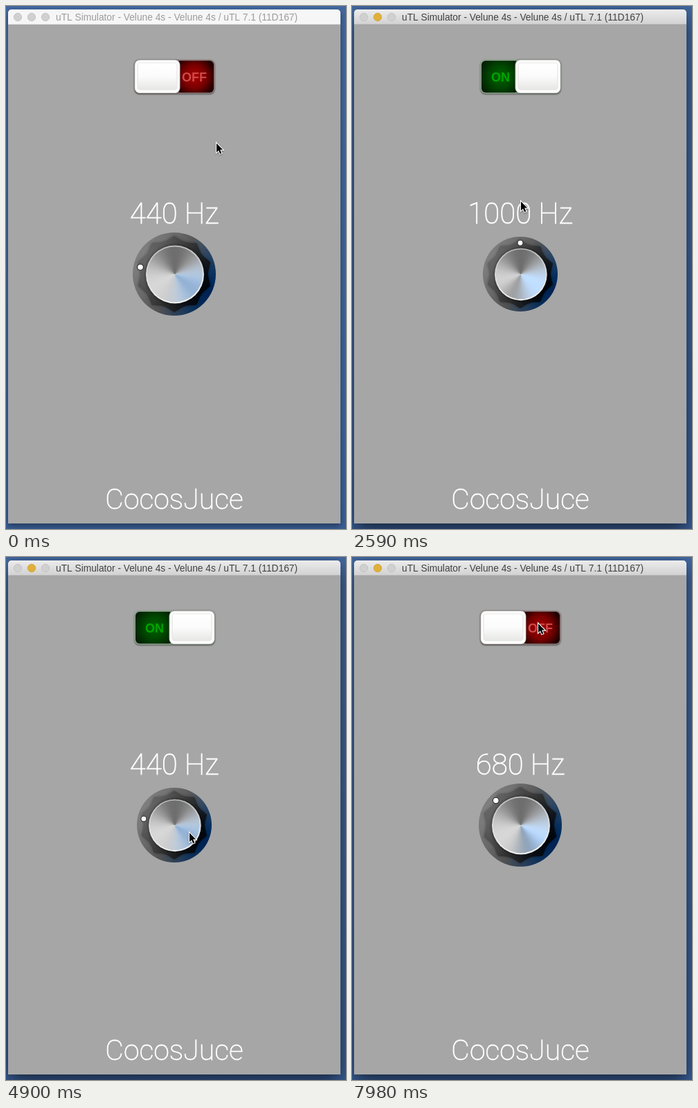
An HTML page with a canvas that plays this animation: 491 by 755 pixels, repeating every 9.03 s.

```html
<!DOCTYPE html>
<html lang="en">
<head>
<meta charset="utf-8">
<title>Tone knob</title>
<style>
html, body { margin: 0; width: 100%; height: 100%; overflow: hidden; background: #3f649b; }
canvas { display: block; }
</style>
</head>
<body>
<canvas id="stage" width="491" height="755"></canvas>
<script>
const ctx = document.getElementById('stage').getContext('2d');
const LOOP = 9030, TICK = 70, TAU = Math.PI * 2;
const rad = degrees => degrees * Math.PI / 180;
const cosd = degrees => Math.cos(rad(degrees));
const lerp = (a, b, k) => a + (b - a) * k;
const clamp = k => Math.min(1, Math.max(0, k));

const linear = k => k;
const easeIn = k => k * k;
const easeBoth = k => k * k * (3 - 2 * k);

// Pointer moves; those with a pitch also turn the knob
const moves = [
  { from: 280, to: 840, x: 229, y: 103, ease: easeBoth },
  { from: 1260, to: 2240, x: 250, y: 345, ease: easeBoth, sway: 50 },
  { from: 2240, to: 2590, x: 243, y: 281, pitch: 1000 },
  { from: 2590, to: 3360, x: 242, y: 193, pitch: 2000 },
  { from: 3710, to: 4900, x: 264, y: 397, pitch: 440, ease: easeIn },
  { from: 4900, to: 5390, x: 262, y: 406, pitch: 340 },
  { from: 5670, to: 6300, x: 251, y: 350, pitch: 480 },
  { from: 6370, to: 6510, x: 251, y: 346, pitch: 680 },
  { from: 6790, to: 7350, x: 268, y: 95, ease: easeBoth }
];

function poseAt(t) {
  const pose = { x: 303, y: 197, pitch: 440 };
  for (const { from, to, x, y, pitch = pose.pitch, ease = linear, sway = 0 } of moves) {
    const k = ease(clamp((t - from) / (to - from)));
    pose.x = lerp(pose.x, x, k) - sway * Math.sin(TAU * k);
    pose.y = lerp(pose.y, y, k);
    pose.pitch = lerp(pose.pitch, pitch, k);
  }
  return pose;
}

function box(x, y, w, h, r, fill) {
  ctx.beginPath();
  ctx.roundRect(x, y, w, h, r);
  ctx.fillStyle = fill;
  ctx.fill();
}

function disc(x, y, r, fill) {
  ctx.beginPath();
  ctx.arc(x, y, r, 0, TAU);
  ctx.fillStyle = fill;
  ctx.fill();
}

function outline(color, width) {
  ctx.strokeStyle = color;
  ctx.lineWidth = width;
  ctx.stroke();
}

function shaded(blur, offsetY, alpha, paint) {
  ctx.save();
  ctx.shadowColor = `rgba(0,0,0,${alpha})`;
  ctx.shadowBlur = blur;
  ctx.shadowOffsetY = offsetY;
  paint();
  ctx.restore();
}

// Colours spread evenly over a gradient
function spread(gradient, ...colors) {
  colors.forEach((color, i) => gradient.addColorStop(i / (colors.length - 1), color));
  return gradient;
}
const vertical = (top, bottom, ...colors) =>
  spread(ctx.createLinearGradient(0, top, 0, bottom), ...colors);

// Grey level and blue tint as functions of the bearing, clockwise from the top
function sweep(gray, tint) {
  const colors = Array.from({ length: 91 }, (_, i) => {
    const g = gray(i * 4), b = tint(i * 4);
    return `rgb(${g - b * 0.5},${g + b * 0.2},${g + b})`;
  });
  return spread(ctx.createConicGradient(rad(-90), 0, 0), ...colors);
}

function text(string, x, y, font, color, align = 'center') {
  ctx.font = font;
  ctx.textAlign = align;
  ctx.fillStyle = color;
  ctx.fillText(string, x, y);
}

function label(string, y, size) {
  text(string, 243, y, `100 ${size}px Roboto, sans-serif`, '#fff');
  ctx.strokeStyle = '#fff';
  ctx.lineWidth = 0.8;
  ctx.strokeText(string, 243, y);
}

function drawWindow(active) {
  ctx.fillStyle = vertical(0, 755, '#42689f', '#3a5f97');
  ctx.fillRect(0, 0, 491, 755);
  shaded(active ? 26 : 10, active ? 10 : 4, active ? 0.6 : 0.4,
    () => box(3, 5, 480, 742, [5, 5, 0, 0], '#a6a6a6'));
  box(3, 5, 480, 21, [5, 5, 0, 0], active ? vertical(5, 26, '#ececec', '#d2d2d2') : '#f6f6f6');
  ctx.fillStyle = active ? '#b4b4b4' : '#d2d2d2';
  ctx.fillRect(3, 26, 480, 1);
  for (let i = 0; i < 3; i++) {
    const lit = active && i === 1;
    disc(17 + 20 * i, 16, 5.7, lit ? '#dfb03a' : '#d0d0d0');
    outline(lit ? '#cfa137' : '#bfbfbf', 0.8);
  }
  text('uTL Simulator - Velune 4s - Velune 4s / uTL 7.1 (11D167)', 72, 21,
    '13.75px "Liberation Sans", Arial, sans-serif', active ? '#424242' : '#9c9c9c', 'left');
}

function drawSwitch(on) {
  const panelX = on ? 187 : 246, thumbX = on ? 236 : 186, middle = on ? 214.5 : 272;
  shaded(2, 1, 0.55, () => box(185.5, 77.5, 116, 49, 7, on ? '#8aa68a' : '#8c7777'));
  const glow = ctx.createRadialGradient(middle, 102, 2, middle, 102, 32);
  box(panelX, 79, 54, 46, 6, on
    ? spread(glow, '#006400', '#004400', '#051c05')
    : spread(glow, '#a80000', '#780000', '#180000'));
  text(on ? 'ON' : 'OFF', middle, 108.5, 'bold 18px "Liberation Sans", Arial, sans-serif',
    on ? '#00a400' : '#cc4a4a');
  shaded(3, 0, 0.5, () => box(thumbX, 78, 65, 47.5, 7, '#fff'));
  outline('#c9cac8', 0.8);
  box(thumbX + 4, 82, 57, 39, 4, vertical(82, 121, '#fff', '#fbfbfb', '#e6e7e5'));
  outline('#e5e5e3', 1.2);
}

function drawKnob(angle, scale) {
  ctx.save();
  ctx.translate(243, 387);
  ctx.scale(scale, scale);

  // The ring is lit from the upper left and reflects blue on the right
  const lit = a => ((1 + cosd(a - 300)) / 2) ** 0.7;
  const blue = a => Math.max(0, cosd(a - 115));
  disc(0, 0, 60, sweep(a => 22 + 104 * lit(a), a => 62 * blue(a)));

  ctx.beginPath();
  for (let a = 0; a < 360; a += 2) {
    const r = 55 - 6 * Math.abs(Math.sin(rad(a * 5)));
    ctx.lineTo(r * Math.sin(rad(a)), -r * Math.cos(rad(a)));
  }
  ctx.closePath();
  ctx.fillStyle = sweep(a => 4 + 96 * lit(a) ** 1.4, a => 10 * blue(a));
  shaded(4, 0, 0.35, () => ctx.fill());

  // Brushed cap, with a darker streak that follows the knob
  const metal = a => 180 - 46 * cosd(a) - 24 * cosd(2 * a)
    - 45 * Math.max(0, cosd(a - angle - 205)) ** 6;
  shaded(5, 0, 0.6, () => disc(1, 0.5, 42, vertical(-42, 42, '#b8baba', '#dedfdf', '#f2f2f2')));
  ctx.translate(0.8, 0.4);
  disc(0, 0, 40, sweep(metal, a => 44 * Math.max(0, cosd(a - 125)) ** 2));
  ctx.translate(-0.8, -0.4);

  const dotX = 50 * Math.sin(rad(angle)), dotY = -50 * Math.cos(rad(angle));
  disc(dotX, dotY, 5, '#303030');
  disc(dotX, dotY, 3.8, '#fff');
  ctx.restore();
}

function drawPointer(x, y) {
  const arrow = new Path2D('M0 0V13L3 10.2 5.2 15.2 7.3 14.3 5.1 9.4H9.2Z');
  ctx.save();
  ctx.translate(x + 1, y + 1.2);
  ctx.strokeStyle = '#fff';
  ctx.lineWidth = 2.2;
  shaded(2, 1, 0.4, () => ctx.stroke(arrow));
  ctx.fillStyle = '#000';
  ctx.fill(arrow);
  ctx.restore();
}

function draw(t) {
  const during = (from, to) => t >= from && t < to;
  const pose = poseAt(t);
  const pitch = Math.round(pose.pitch / 20) * 20;
  drawWindow(t >= 1120);
  if (!during(1120, 1190) && !during(7910, 7980)) drawSwitch(during(1190, 7910));
  if (during(7770, 7910)) box(186, 78, 115, 48, 7, 'rgba(0,0,0,.2)');
  label(pitch + ' Hz', 313.5, 42);
  drawKnob((pitch - 1000) * 0.14, during(2310, 6860) ? 0.9 : 1);
  label('CocosJuce', 726, 41);
  drawPointer(pose.x, pose.y);
}

function frame() {
  draw(Math.floor(performance.now() % LOOP / TICK) * TICK);
  requestAnimationFrame(frame);
}
frame();
</script>
</body>
</html>
```
